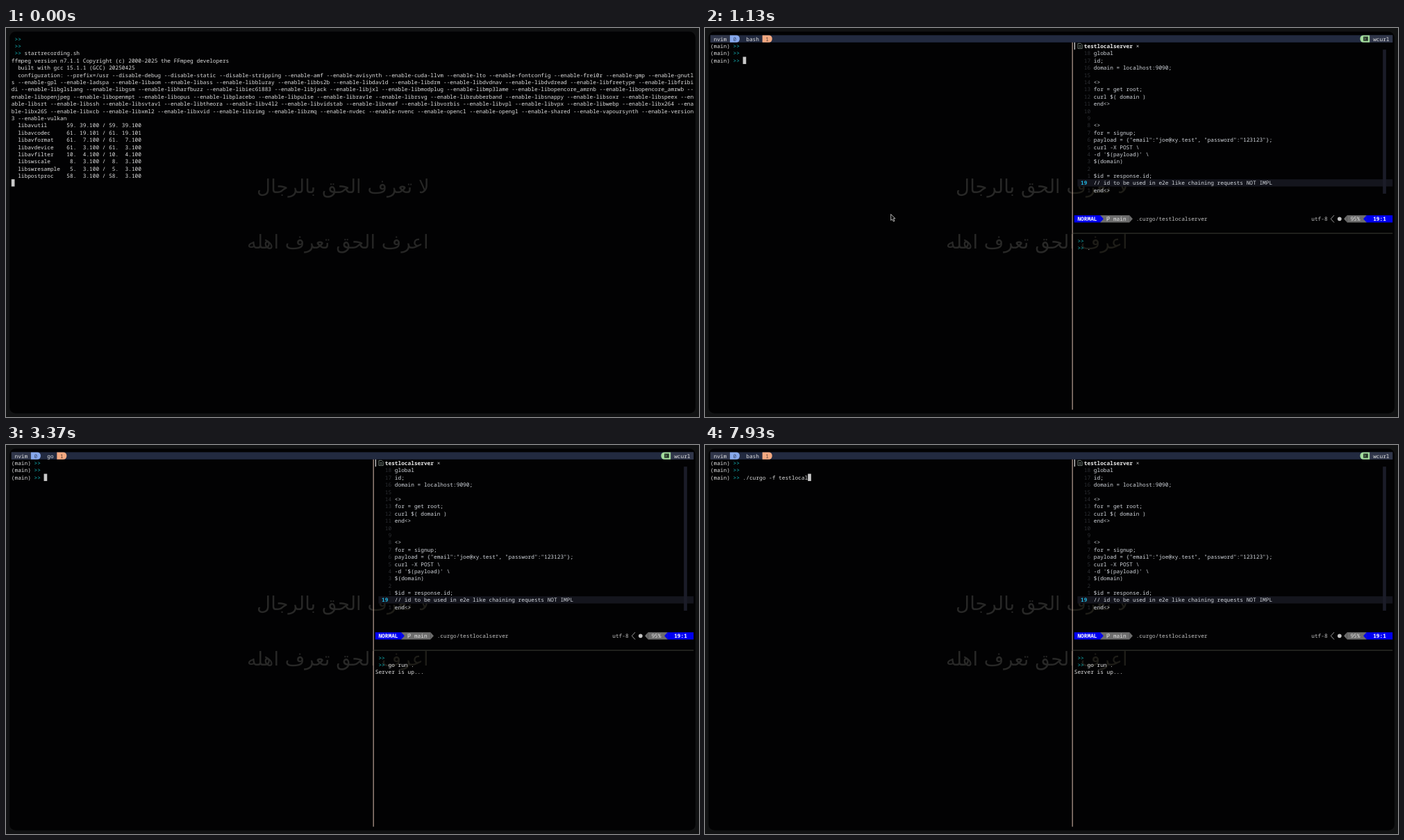
Write an HTML page with a canvas that moves like this. It is 998x561 px and loops after 8000 ms.

```html
<!DOCTYPE html>
<html lang="en">
<head>
<meta charset="utf-8">
<title>Terminal session</title>
<style>
html, body { margin: 0; width: 100%; height: 100%; overflow: hidden; background: #111213; }
canvas { display: block; width: 100vw; height: 100vh; }
</style>
</head>
<body>
<canvas id="screen"></canvas>
<script>
const canvas = document.getElementById('screen');
const ctx = canvas.getContext('2d');
const LOOP = 8000, W = 1920, H = 1080;
const CELL_W = 9, CELL_H = 20, LEFT = 15, TOP = 20, COLS = 210;
const FG = '#e2e2e2', CYAN = '#14bcc0', MAGENTA = '#c21ec4', YELLOW = '#c4c92c';
const BLUE = '#0000f0', GREY = '#6d6d6d', PEACH = '#f0b594', BAR = '#222a40', TAB = '#30364a';

const X = col => LEFT + col * CELL_W;
const Y = row => TOP + row * CELL_H;

function put(col, row, text, color = FG, bold = false) {
  ctx.font = `${bold ? 'bold ' : ''}15px "Noto Sans Mono", "DejaVu Sans Mono", monospace`;
  ctx.fillStyle = color;
  ctx.fillText(text, X(col), Y(row) + 16);
}
function fill(col, row, cols, color, rows = 1) {
  ctx.fillStyle = color;
  ctx.fillRect(X(col), Y(row), cols * CELL_W, rows * CELL_H);
}
function shape(color, ...points) {
  ctx.fillStyle = color;
  ctx.beginPath();
  points.forEach(([x, y]) => ctx.lineTo(x, y));
  ctx.fill();
}
function line(color, width, ...points) {
  ctx.strokeStyle = color;
  ctx.lineWidth = width;
  ctx.beginPath();
  points.forEach(([x, y]) => ctx.lineTo(x, y));
  ctx.stroke();
}
function pill(col, row, cols, color, radii) {
  ctx.fillStyle = color;
  ctx.beginPath();
  ctx.roundRect(X(col), Y(row), cols * CELL_W, CELL_H, radii);
  ctx.fill();
}
// Powerline wedge: dir 1 points right, -1 points left.
function wedge(col, row, color, dir) {
  const base = X(dir > 0 ? col : col + 1), y = Y(row);
  shape(color, [base, y], [base + dir * CELL_W, y + 10], [base, y + 20]);
}
const cursor = (col, row) => fill(col, row, 1, '#c9c9c9');

function wrap(text) {
  const rows = [];
  for (let i = 0; i < text.length; i += COLS) rows.push(text.slice(i, i + COLS));
  return rows;
}

const features = `amf avisynth cuda-llvm lto fontconfig frei0r gmp gnutls gpl ladspa libaom libass
  libbluray libbs2b libdav1d libdrm libdvdnav libdvdread libfreetype libfribidi libglslang libgsm
  libharfbuzz libiec61883 libjack libjxl libmodplug libmp3lame libopencore_amrnb libopencore_amrwb
  libopenjpeg libopenmpt libopus libplacebo libpulse librav1e librsvg librubberband libsnappy libsoxr
  libspeex libsrt libssh libsvtav1 libtheora libv4l2 libvidstab libvmaf libvorbis libvpl libvpx libwebp
  libx264 libx265 libxcb libxml2 libxvid libzimg libzmq nvdec nvenc opencl opengl shared vapoursynth
  version3 vulkan`.split(/\s+/);

const libraries = ['util 59. 39', 'codec 61. 19', 'format 61.  7', 'device 61.  3',
  'filter 10.  4', 'swscale  8.  3', 'swresample  5.  3', 'postproc 58.  3'].map((entry, i) => {
  const cut = entry.indexOf(' ');
  const version = `${entry.slice(cut + 1)}.${i === 1 ? 101 : 100}`;
  const name = (i < 5 ? 'av' : '') + entry.slice(0, cut);
  return `  lib${name.padEnd(12)}${version} / ${version}`;
});

const banner = [
  'ffmpeg version n7.1.1 Copyright (c) 2000-2025 the FFmpeg developers',
  '  built with gcc 15.1.1 (GCC) 20250425',
  ...wrap('  configuration: --prefix=/usr --disable-debug --disable-static --disable-stripping' +
    features.map(name => ' --enable-' + name).join('')),
  ...libraries
];

const capture = [
  ['[x11grab @ 0x55e04d04cc00]', ' Stream #0: not enough frames to estimate rate; consider increasing probesize'],
  "Input #0, x11grab, from ':0.0+0,0':",
  '  Duration: N/A, start: 1759589310.925780, bitrate: 1990656 kb/s',
  '  Stream #0:0: Video: rawvideo (BGR[0] / 0x524742), bgr0, 1920x1080, 1990656 kb/s, 30 fps, 1000k tbr, 1000k tbn',
  ['[aist#1:0/pcm_s16le @ 0x55e04d05fcc0]', ' Guessed Channel Layout: stereo'],
  "Input #1, pulse, from 'default':",
  '  Duration: N/A, start: 1759589310.945448, bitrate: 1536 kb/s',
  '  Stream #1:0: Audio: pcm_s16le, 48000 Hz, stereo, s16, 1536 kb/s',
  'Stream mapping:',
  '  Stream #0:0 -> #0:0 (rawvideo (native) -> h264 (h264_nvenc))',
  '  Stream #1:0 -> #0:1 (pcm_s16le (native) -> aac (native))',
  'Press [q] to stop, [?] for help'
];

const editorLines = `global
id;
domain = localhost:9090;

<>
for = get root;
curl $( domain )
end<>


<>
for = signup;
payload = {"email":"joe@xy.test", "password":"123123"};
curl -X POST \\
-d '$(payload)' \\
$(domain)

$id = response.id;
// id to be used in e2e like chaining requests NOT IMPL
end<>`.split('\n');

function wallpaper(color) {
  ctx.save();
  ctx.font = '53px "DejaVu Sans", sans-serif';
  ctx.direction = 'rtl';
  ctx.textAlign = 'right';
  ctx.fillStyle = color;
  ctx.fillText('لا تعرف الحق بالرجال', 1173, 458);
  ctx.fillText('اعرف الحق تعرف اهله', 1171, 612);
  ctx.restore();
}
function wallpaperPart(x, width, color) {
  ctx.save();
  ctx.beginPath();
  ctx.rect(x, 0, width, H);
  ctx.clip();
  wallpaper(color);
  ctx.restore();
}

function recorder(running) {
  for (let row = 0; row < 3; row++) put(1, row, '>>', CYAN);
  put(4, 2, 'startrecording.sh');
  banner.forEach((text, i) => put(0, 3 + i, text));
  const next = 3 + banner.length;
  if (!running) return cursor(0, next);
  capture.forEach((entry, i) => {
    if (typeof entry === 'string') return put(0, next + i, entry);
    put(0, next + i, entry[0], MAGENTA);
    put(entry[0].length, next + i, entry[1], YELLOW);
  });
  ctx.strokeStyle = '#c9c9c9';
  ctx.lineWidth = 1.5;
  ctx.strokeRect(X(0) + 1, Y(next + capture.length) + 1, 8, 18);
}

function tabBar(program) {
  fill(0, 0, COLS, BAR);
  fill(0, 0, 6, TAB);
  put(1, 0, 'nvim');
  pill(6, 0, 3, '#86a8ec', [0, 9, 9, 0]);
  put(7, 0, '0', '#3c4a70');
  const box = 12 + program.length;
  put(11, 0, program);
  pill(box, 0, 3, '#f4a981', [0, 9, 9, 0]);
  put(box + 1, 0, '1', '#5a4038');
  pill(200, 0, 3, '#a2dc9c', [9, 0, 0, 9]);
  ctx.fillStyle = '#28382c';
  ctx.fillRect(X(201), 24, 13, 12);
  line('#a2dc9c', 1.5, [X(201) + 3, 27], [X(201) + 6, 30], [X(201) + 3, 33]);
  fill(203, 0, 7, TAB);
  put(204, 0, 'wcurl');
}

function editor() {
  ctx.fillStyle = '#d5d5d5';
  ctx.fillRect(X(112), Y(1), 2.5, CELL_H);
  const iconX = X(113) + 1, iconY = Y(1) + 3;
  line('#8a9a90', 1.5, [iconX, iconY], [iconX + 8, iconY], [iconX + 12, iconY + 4],
    [iconX + 12, iconY + 14], [iconX, iconY + 14], [iconX, iconY]);
  for (const dy of [6, 10]) line('#8a9a90', 1.5, [iconX + 3, iconY + dy], [iconX + 9, iconY + dy]);
  put(115, 1, 'testlocalserver', '#ededed', true);
  put(131, 1, '×');

  fill(113, 20, 97, '#14151d');
  fill(207, 2, 1, '#1b1c28', 20);
  editorLines.forEach((text, i) => {
    const row = 2 + i, offset = Math.abs(18 - i);
    if (offset) put(115, row, String(offset).padStart(2), '#2d2f33');
    else put(114, row, '19', '#20b4e0', true);
    put(118, row, text, '#d4d8de');
  });
}

function statusLine() {
  const row = 25, y = Y(row);
  fill(120, row, 9, GREY);
  wedge(129, row, GREY, 1);
  fill(112, row, 8, BLUE);
  wedge(120, row, BLUE, 1);
  put(113, row, 'NORMAL', '#fff', true);
  const bx = X(122) + 1;
  line('#f0f0f0', 1.5, [bx, y + 4], [bx, y + 16]);
  line('#f0f0f0', 1.5, [bx, y + 12], [bx + 6, y + 10], [bx + 6, y + 5], [bx + 2, y + 5]);
  put(124, row, 'main');
  put(131, row, '.curgo/testlocalserver', '#c4c4c4');
  put(185, row, 'utf-8', '#c4c4c4');
  line('#c4c4c4', 1.5, [X(192), y], [X(191), y + 10], [X(192), y + 20]);
  ctx.fillStyle = '#c4c4c4';
  ctx.beginPath();
  ctx.arc(1758, y + 10, 5.5, 0, 7);
  ctx.fill();
  wedge(195, row, GREY, -1);
  fill(196, row, 6, GREY);
  put(197, row, '95%');
  wedge(201, row, BLUE, -1);
  fill(202, row, 8, BLUE);
  put(204, row, '19:1', '#fff', true);
}

function paneBorders(shellActive) {
  const x = X(111) + 4, mid = Y(27) + 10, bottom = Y(52);
  line(shellActive ? '#45485a' : '#d5b8a9', 2, [x, Y(1)], [x, mid - 10]);
  line(shellActive ? PEACH : '#d5b8a9', 2, [x, mid - 10], [x, bottom]);
  line(shellActive ? PEACH : '#4a4b40', shellActive ? 2 : 1.6, [x, mid], [X(COLS), mid]);
}

// Each run types its text evenly between two times.
const typed = (t, runs) => runs.map(([from, to, text]) => {
  const done = Math.floor((t - from) / (to - from) * (text.length - 1)) + 1;
  return text.slice(0, Math.max(0, done));
}).join('');

function session(t, shift = 0) {
  const shellActive = t >= 1750 && t < 3200;
  ctx.save();
  ctx.translate(0, shift);
  tabBar(t >= 3100 && t < 3900 ? 'go' : 'bash');
  editor();
  ctx.restore();
  statusLine();
  paneBorders(shellActive);

  const command = typed(t, [[3850, 4750, './curgo '], [5300, 5850, '-f '], [6500, 7880, 'testlocal']]);
  for (let row = 1; row <= 3; row++) {
    put(0, row, '(main)');
    put(7, row, '>>', CYAN);
  }
  put(10, 3, command);
  if (!shellActive) cursor(10 + command.length, 3);

  const run = typed(t, [[1850, 2420, 'go run '], [2590, 2600, '.']]);
  put(113, 28, '>>', CYAN);
  put(113, 29, '>>', CYAN);
  put(116, 29, run);
  const entered = t >= 2730, serving = t >= 2950;
  if (serving) put(112, 30, 'Server is up...');
  if (shellActive) {
    if (serving) cursor(112, 31);
    else if (entered) cursor(112, 30);
    else cursor(116 + run.length, 29);
  }
}

function pointer() {
  const arrow = [[0, 0], [0, 17], [4, 14], [7, 20], [10, 19], [7, 12], [12, 12], [0, 0]]
    .map(([x, y]) => [515 + x, 517 + y]);
  shape('#050505', ...arrow);
  line('#d8d8d8', 1.6, ...arrow);
}

function render(t) {
  ctx.setTransform(canvas.width / W, 0, 0, canvas.height / H, 0, 0);
  ctx.globalAlpha = 1;
  ctx.fillStyle = '#111213';
  ctx.fillRect(0, 0, W, H);
  ctx.fillStyle = '#020203';
  ctx.beginPath();
  ctx.roundRect(10, 10, 1900, 1060, 16);
  ctx.fill();

  const reveal = Math.min(1, Math.max(0, (t - 360) / 200));
  if (t < 240) wallpaper('#262625');
  else if (reveal < 1) {
    ctx.save();
    ctx.filter = 'blur(1px)';
    ctx.globalAlpha = 0.2 * (1 - reveal);
    wallpaper('#262625');
    session(t, CELL_H);
    ctx.restore();
  }
  if (reveal < 1) {
    ctx.globalAlpha = 1 - reveal;
    recorder(t >= 100);
  }
  if (reveal > 0) {
    ctx.globalAlpha = reveal;
    wallpaperPart(0, X(111), '#282827');
    wallpaperPart(X(111), W, '#1e1d18');
    session(t);
  }
  ctx.globalAlpha = 1;
  if (t >= 100 && t < 2900) pointer();
}

function resize() {
  const ratio = devicePixelRatio || 1;
  canvas.width = Math.round(innerWidth * ratio);
  canvas.height = Math.round(innerHeight * ratio);
  ctx.textRendering = 'geometricPrecision';
}
addEventListener('resize', resize);
resize();

let start;
function tick(now) {
  start ??= now;
  render((now - start) % LOOP);
  requestAnimationFrame(tick);
}
render(0);
requestAnimationFrame(tick);
</script>
</body>
</html>
```
